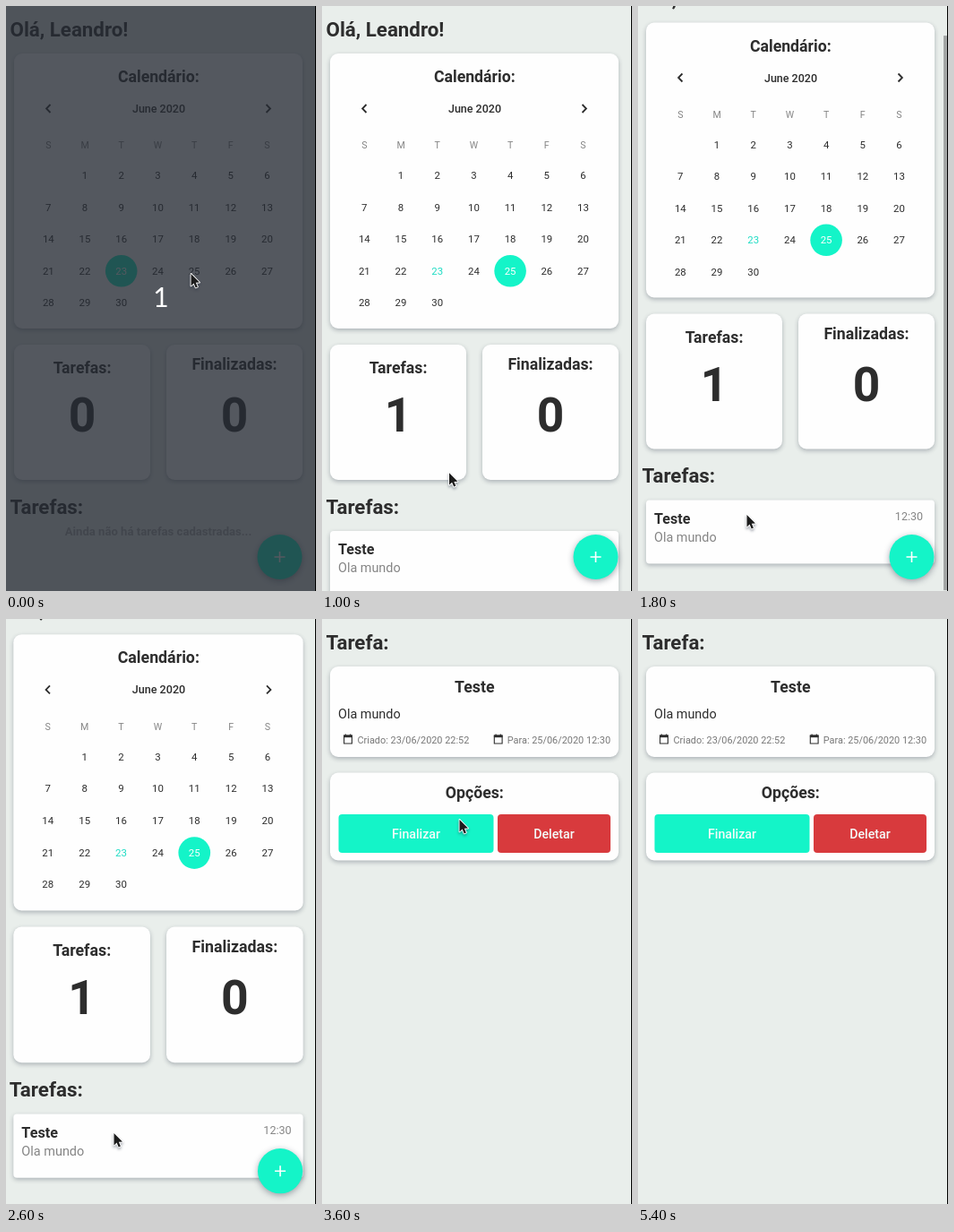
Recreate the animation shown at these times as an HTML page with a canvas. Size 346x653 px, loop 5600 ms.

```html
<!DOCTYPE html>
<html lang="pt">
<head>
<meta charset="utf-8">
<title>Tarefas</title>
<style>
html, body { margin: 0; width: 100%; height: 100%; overflow: hidden; background: #e9eeeb; }
canvas { display: block; width: 346px; height: 653px; }
</style>
</head>
<body>
<canvas id="stage" width="346" height="653"></canvas>
<script>
const ctx = document.getElementById('stage').getContext('2d');
const W = 346, H = 653, MID = 172.5, LOOP = 5600, STEP = 100;
const BG = '#e9eeeb', TEAL = '#14f4c8', RED = '#d83a3d', INK = '#2d2d2d', GRAY = '#858585';
const HEADING = 22.3, TITLE = 17.7;

const ramp = (t, from, to) => Math.min(1, Math.max(0, (t - from) / (to - from)));
const ease = (t, from, to) => {
  const k = ramp(t, from, to);
  return k * k * (3 - 2 * k);
};

const POINTER_START = { x: 205, y: 297 };
const POINTER_MOVES = [
  { from: 600, until: 1100, x: 133, y: 545 },
  { from: 1100, until: 1700, x: 119, y: 418 },
  { from: 1700, until: 1800, x: 120, y: 566 },
  { from: 1900, until: 2200, x: 119, y: 572 },
  { from: 2900, until: 3600, x: 152, y: 222, via: { x: 75, y: 420 } },
  { from: 3600, until: 3900, x: 137, y: 239 },
  { from: 4200, until: 4300, x: 150, y: 239 },
  { from: 4400, until: 5100, x: 3, y: -2, via: { x: 365, y: 250 } }
];

// Each move is a quadratic curve from wherever the previous one ended.
function pointerAt(t) {
  return POINTER_MOVES.reduce((a, move) => {
    const k = ease(t, move.from, move.until);
    const mid = move.via || { x: (a.x + move.x) / 2, y: (a.y + move.y) / 2 };
    const curve = axis => a[axis] * (1 - k) ** 2 + 2 * mid[axis] * k * (1 - k) + move[axis] * k * k;
    return { x: curve('x'), y: curve('y') };
  }, POINTER_START);
}

function text(str, x, y, size, { weight = 400, color = INK, align = 'left', family = 'Roboto' } = {}) {
  ctx.font = `${weight} ${size}px ${family}, sans-serif`;
  ctx.fillStyle = color;
  ctx.textAlign = align;
  ctx.fillText(str, x, y);
}

const bold = (str, x, y, size, align = 'center') => text(str, x, y, size, { weight: 700, align });
const heading = (str, y) => bold(str, 4.5, y, HEADING, 'left');

function page() {
  ctx.fillStyle = BG;
  ctx.fillRect(0, 0, W, H);
}

function box(x, y, w, h, r, color) {
  ctx.fillStyle = color;
  ctx.beginPath();
  ctx.roundRect(x, y, w, h, r);
  ctx.fill();
}

function disc(x, y, r, color) {
  ctx.fillStyle = color;
  ctx.beginPath();
  ctx.arc(x, y, r, 0, Math.PI * 2);
  ctx.fill();
}

function strokePath(d, color, width) {
  ctx.strokeStyle = color;
  ctx.lineWidth = width;
  ctx.stroke(new Path2D(d));
}

function at(x, y, draw, sx = 1, sy = sx) {
  ctx.save();
  ctx.translate(x, y);
  ctx.scale(sx, sy);
  draw();
  ctx.restore();
}

function raised(draw, blur = 5, alpha = 0.3) {
  ctx.save();
  ctx.shadowColor = `rgba(30, 40, 60, ${alpha})`;
  ctx.shadowBlur = blur;
  ctx.shadowOffsetY = 2;
  draw();
  ctx.restore();
}

const card = (x, y, w, h, r = 9) => raised(() => box(x, y, w, h, r, '#fefefe'));

function calendar(selected) {
  card(9, 53, 322, 307);
  bold('Calendário:', 170.3, 85, TITLE);
  text('June 2020', 170.5, 119, 12.5, { weight: 500, align: 'center' });
  const chevron = () => strokePath('M2.2 -4.5L-2.2 0L2.2 4.5', INK, 1.8);
  at(47.3, 114.5, chevron);
  at(292.7, 114.5, chevron, -1, 1);

  const colX = c => 47.3 + c * 40.7;
  [...'SMTWTFS'].forEach((d, c) => text(d, colX(c), 159, 10.6, { color: GRAY, align: 'center' }));
  for (let day = 1; day <= 30; day++) {
    const x = colX(day % 7), y = 189 + Math.floor(day / 7) * 35.5;
    if (day === selected) disc(x, y + 0.3, 17.8, TEAL);
    const color = day === selected ? '#fff' : day === 23 ? '#1fdcc4' : INK;
    text(day, x, y + 4, 11.4, { color, align: 'center' });
  }
}

function counter(label, value, x, labelY) {
  card(x - 76, 378, 152, 151);
  bold(label, x, labelY, TITLE);
  bold(value, x, 475, 53.3);
}

function home(hasTask, scroll, barAlpha) {
  page();
  at(0, -scroll, () => {
    heading('Olá, Leandro!', 34);
    calendar(hasTask ? 25 : 23);
    counter('Tarefas:', hasTask ? 1 : 0, 85, 410);
    counter('Finalizadas:', 0, 255, 406);
    heading('Tarefas:', 566.5);
    if (hasTask) {
      card(9, 586, 322, 71, 4);
      bold('Teste', 18, 612, 16.1, 'left');
      text('Ola mundo', 18, 632, 14.4, { color: GRAY });
      text('12:30', 318, 608.5, 12.5, { color: GRAY, align: 'right' });
    } else {
      text('Ainda não há tarefas cadastradas...', 170, 591, 13.1, { weight: 700, color: '#aaa', align: 'center' });
    }
  });

  at(305.5, 615, () => {
    raised(() => disc(0, 0, 25, TEAL), 7, 0.4);
    strokePath('M-6 0H6M0 -6V6', '#fff', 1.6);
  });

  ctx.globalAlpha = barAlpha;
  ctx.fillStyle = '#a3a6a5';
  ctx.fillRect(341, scroll * 0.96, 4, 619);
  ctx.globalAlpha = 1;
}

function dated(label, iconX, x, align) {
  at(iconX, 134, () => {
    strokePath('M-4.4 -4H4.4V5H-4.4Z', INK, 1.1);
    strokePath('M-4.8 -3.1H4.8', INK, 2.6);
    strokePath('M-2.6 -5.6V-3M2.6 -5.6V-3', INK, 1.2);
  });
  text(label, x, 138.5, 10.9, { color: '#777', align });
}

function button(label, x, w, color) {
  box(x, 218, w, 43, 4, color);
  text(label, x + w / 2, 245, 14.2, { weight: 500, color: '#f4fbf9', align: 'center' });
}

function detail() {
  page();
  heading('Tarefa:', 33.5);
  card(9, 53, 322, 101);
  bold('Teste', 170.3, 81.5, TITLE);
  text('Ola mundo', 18, 110.5, 14.4);
  dated('Criado: 23/06/2020 22:52', 29, 39.5, 'left');
  dated('Para: 25/06/2020 12:30', 196.7, 322, 'right');
  card(9, 171.5, 322, 98);
  bold('Opções:', 170.3, 200, TITLE);
  button('Finalizar', 18.5, 173, TEAL);
  button('Deletar', 196, 126, RED);
}

const zoomed = (k, draw) => at(MID * (1 - k), H / 2 * (1 - k), draw, k);

function pointer({ x, y }) {
  const arrow = new Path2D('M1.5 2V15.4L4.6 12.6L6.7 17.4L8.9 16.4L6.8 11.8L11 11.6Z');
  at(x, y, () => {
    ctx.lineJoin = 'round';
    ctx.strokeStyle = '#fff';
    ctx.lineWidth = 1.8;
    raised(() => ctx.stroke(arrow), 3, 0.4);
    ctx.fillStyle = '#1c1c1c';
    ctx.fill(arrow);
  });
}

function countdown() {
  ctx.fillStyle = 'rgba(36, 41, 50, 0.78)';
  ctx.fillRect(0, 0, W, H);
  text('1', 173, 336, 30, { color: '#fff', align: 'center', family: 'Lato' });
}

function render(t) {
  const push = ease(t, 2555, 2920);
  const scroll = 34.5 * ease(t, 1100, 1600);
  const barAlpha = ramp(t, 1100, 1200) - ramp(t, 1900, 2200);

  page();
  if (push < 0.7) zoomed(1 + push * 0.1, () => home(t >= 600, scroll, barAlpha));
  else zoomed(0.85 + push * 0.15, detail);
  if (t < 200) countdown();
  ctx.fillStyle = '#000';
  ctx.fillRect(345, 0, 1, H);
  if (t < 5400) pointer(pointerAt(t));
}

const start = performance.now();
function tick() {
  const t = (performance.now() - start) % LOOP;
  render(Math.floor(t / STEP) * STEP);
  requestAnimationFrame(tick);
}
tick();
</script>
</body>
</html>
```
